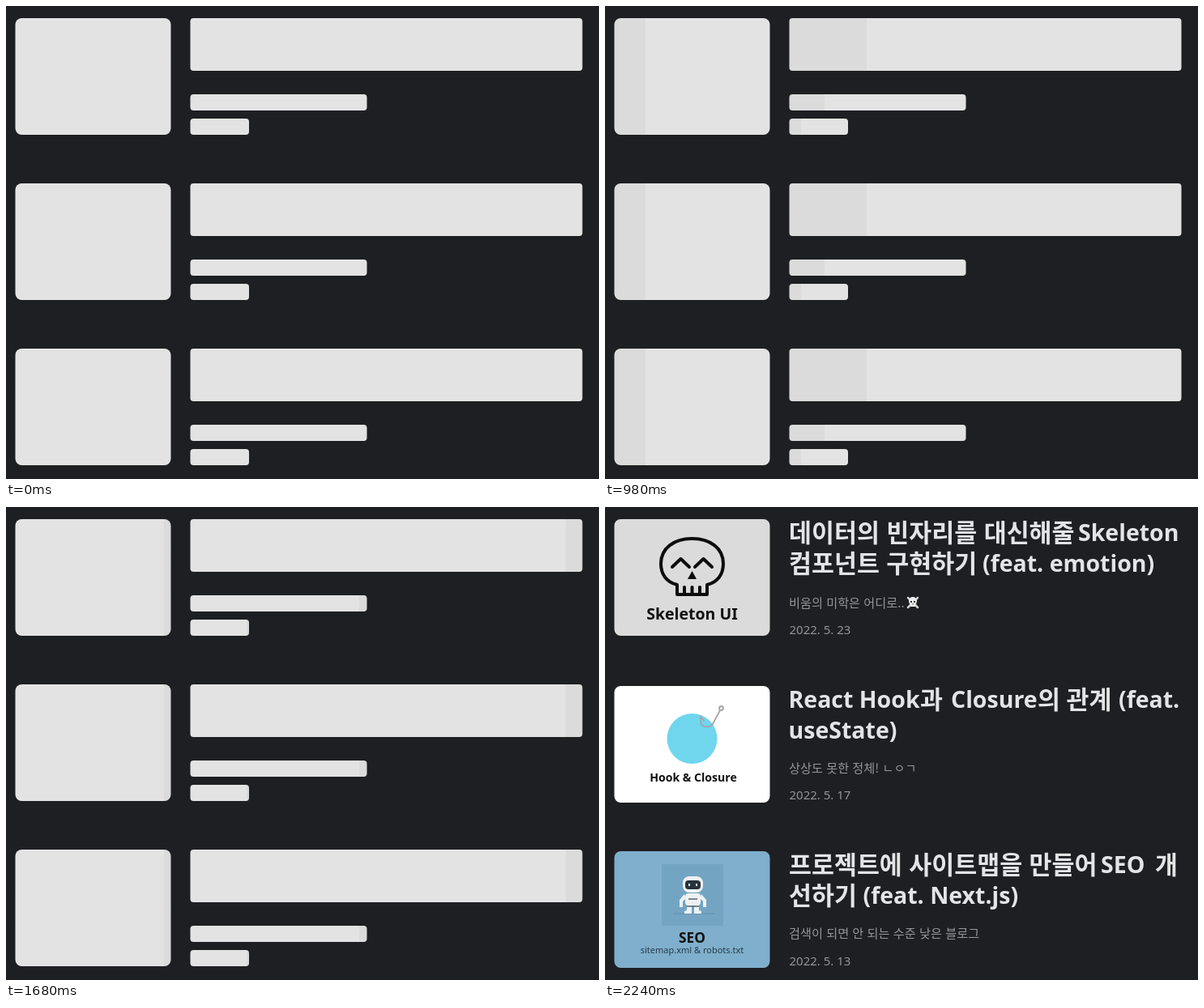
An HTML page that plays this animation: 732x584 px, repeating every 2.45 s.

```html
<!DOCTYPE html>
<html lang="ko">
<head>
<meta charset="utf-8">
<style>
html, body { margin: 0; width: 100%; height: 100%; overflow: hidden; background: #1e1f22; }
svg { display: block; }
text { font-family: "Noto Sans", "Noto Sans CJK KR", "Noto Sans CJK", sans-serif; white-space: pre; }
.ko { font-family: "Noto Sans CJK KR", "Noto Sans CJK", sans-serif; }
.title { font-size: 28.5px; font-weight: 700; fill: #e3e4e6; }
.title.ko { font-size: 30.4px; }
.sub { font-size: 15.2px; fill: #939598; }
.date { font-size: 15px; fill: #939598; }
.label { font-weight: 700; fill: #111; text-anchor: middle; }
.line { fill: none; stroke: #0c0c0c; stroke-width: 4; stroke-linecap: round; stroke-linejoin: round; }
</style>
</head>
<body>
<svg width="732" height="584" viewBox="0 0 732 584">
  <defs>
    <linearGradient id="shine" x1="0" x2=".75" y1="0" y2="0">
      <stop offset="0" stop-color="#e3e3e3"/><stop offset="0" stop-color="#dbdbdb"/>
      <stop offset=".3333" stop-color="#dbdbdb"/><stop offset=".3333" stop-color="#d5d5d5"/>
      <stop offset=".6667" stop-color="#d5d5d5"/><stop offset=".6667" stop-color="#dbdbdb"/>
      <stop offset="1" stop-color="#dbdbdb"/><stop offset="1" stop-color="#e3e3e3"/>
    </linearGradient>
  </defs>
  <g id="skeleton" fill="url(#shine)"></g>
  <g id="content">
    <!-- skull card -->
    <rect x="11.5" y="15" width="192" height="144" rx="8" fill="#dbdbdb"/>
    <path class="line" d="M89 96C76 93 69 83 69 70C69 51 85 39 107.500 39C130 39 146 51 146 70C146 83 139 93 126 96V108H89ZM98 99V107M107.500 99V107M117 99V107M83 74L93.500 64L104 74M111 74L121.500 64L132 74"/>
    <path d="M107.500 79L113 89H102Z" fill="#0c0c0c"/>
    <text class="label" x="107.500" y="139" font-size="19.5">Skeleton UI</text>

    <!-- hook card -->
    <rect x="11.5" y="221" width="192" height="144" rx="8" fill="#fff"/>
    <circle cx="107.500" cy="286" r="31" fill="#6fd6ee"/>
    <g fill="none" stroke="#a3a6a8" stroke-width="1.800" stroke-linecap="round">
      <circle cx="143.500" cy="248.500" r="2.500"/>
      <path d="M142 251L134 266C130 274 118 273 118 264V259L122 264"/>
    </g>
    <text class="label" x="109" y="339" font-size="14.1">Hook &amp; Closure</text>

    <!-- robot card -->
    <rect x="11.5" y="425" width="192" height="144" rx="8" fill="#7fafcc"/>
    <rect x="70" y="441" width="76" height="76" fill="#73a5c3"/>
    <path d="M84 502H136" stroke="#5f8eab"/>
    <g fill="#eef1f2">
      <rect x="96" y="456" width="25" height="20" rx="8"/>
      <rect x="99" y="477" width="19" height="15" rx="4"/>
      <path d="M98 478L92 485V494H96V487L100 483ZM119 478L125 485V494H121V487L117 483ZM101 491H107V502H98V499L101 498ZM110 491H116V498L119 499V502H110Z"/>
    </g>
    <rect x="99" y="461" width="19" height="11" rx="4" fill="#25323b"/>
    <path d="M104 465V468M113 465V468" stroke="#d9eef6" stroke-width="2"/>
    <path d="M103 484H114M101 493H116" stroke="#53636d" stroke-width="1.500"/>
    <text class="label" x="107.500" y="538" font-size="17.3">SEO</text>
    <text x="107.500" y="551" font-size="11" text-anchor="middle" fill="#263c49">sitemap.xml &amp; robots.txt</text>

    <!-- skull and crossbones -->
    <path d="M374 112L386 124M386 112L374 124" stroke="#d2d2d2" stroke-width="2.500" stroke-linecap="round"/>
    <path d="M375 116a5 5 0 0 1 10 0q0 3-2 4v3h-6v-3q-2-1-2-4" fill="#ededed"/>
    <path d="M377 116h2v2h-2zM381 116h2v2h-2zM379.500 119h1v1.500h-1z" fill="#303134"/>
  </g>
</svg>
<script>
const LOOP = 2450, STEP = 70, LOADED = 2170;
const $ = id => document.getElementById(id);
const skeleton = $("skeleton"), content = $("content"), shine = $("shine");

function add(parent, tag, attrs, text = "") {
  const el = document.createElementNS("http://www.w3.org/2000/svg", tag);
  for (const key in attrs) el.setAttribute(key, attrs[key]);
  el.textContent = text;
  parent.append(el);
}

for (const top of [15, 219, 423]) {
  const bar = (x, y, width, height, rx) =>
    add(skeleton, "rect", { x, y: top + y, width, height, rx });
  bar(11.5, 0, 192, 144, 8);
  bar(227.5, 0, 484, 65, 4);
  bar(227.5, 94, 218, 20, 4);
  bar(227.5, 124, 72.5, 20, 4);
}

// Each title run is [x, line, text]; Hangul and Latin use different fonts.
const posts = [
  { y: 42, sub: "비움의 미학은 어디로..", date: "2022. 5. 23", title: [
    [227, 0, "데이터의 빈자리를 대신해줄"], [584, 0, "Skeleton"],
    [227, 1, "컴포넌트 구현하기"], [466, 1, "(feat. emotion)"]] },
  { y: 248, sub: "상상도 못한 정체! ㄴㅇㄱ", date: "2022. 5. 17", title: [
    [226.5, 0, "React Hook"], [389, 0, "과"], [427, 0, "Closure"], [534, 0, "의"],
    [569.5, 0, "관계"], [634, 0, "(feat."], [226.5, 1, "useState)"]] },
  { y: 452, sub: "검색이 되면 안 되는 수준 낮은 블로그", date: "2022. 5. 13", title: [
    [227, 0, "프로젝트에 사이트맵을 만들어"], [612, 0, "SEO"], [679, 0, "개"],
    [227, 1, "선하기"], [318.5, 1, "(feat. Next.js)"]] }
];

posts.forEach(({ y, sub, date, title }, i) => {
  for (const [x, line, text] of title) {
    const ko = /[가-힣]/.test(text);
    add(content, "text", { x, y: y + line * 38 + (ko ? 1 : 0), class: ko ? "title ko" : "title" }, text);
  }
  add(content, "text", { x: 227, y: 124 + i * 204, class: "sub ko" }, sub);
  add(content, "text", { x: 227.5, y: 157 + i * 204.3, class: "date" }, date);
});

function draw() {
  const t = Math.floor(performance.now() % LOOP / STEP) * STEP;
  const loaded = t >= LOADED;
  skeleton.style.display = loaded ? "none" : "";
  content.style.display = loaded ? "" : "none";
  // The band crosses every bar at a speed relative to the bar's width.
  shine.setAttribute("gradientTransform", `translate(${(t - 1120) * 0.604 / 280 - 0.25})`);
  requestAnimationFrame(draw);
}
draw();
</script>
</body>
</html>
```
